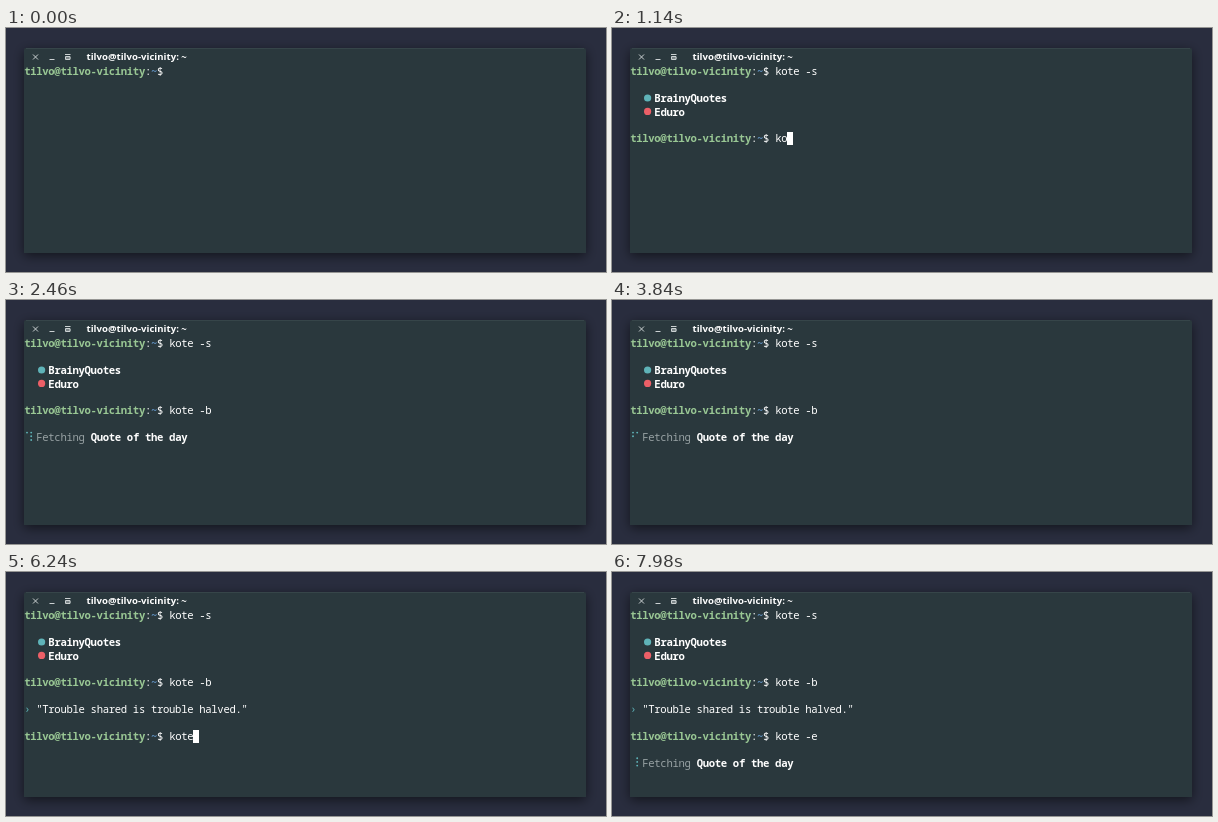
An HTML page for the animation above (8000 ms loop, 600 by 244 pixels).

```html
<!DOCTYPE html>
<html lang="en">
<head>
<meta charset="utf-8">
<title>Terminal</title>
<style>
  html, body { margin: 0; width: 100%; height: 100%; overflow: hidden; background: #292d3e; }
  svg { display: block; width: 100vw; height: 100vh; }
  .mono { font: 10.6px "Noto Sans Mono", "DejaVu Sans Mono", monospace; letter-spacing: -.32px; white-space: pre; fill: #fff; }
  .bold { font-weight: 700; }
  .title { font: 700 9.6px "Open Sans", "Noto Sans", sans-serif; fill: #fff; }
  .user { fill: #99c794; }
  .path { fill: #6699cc; }
  .dim { fill: #98a2a4; }
  .teal { fill: #5fb3b8; }
  .red { fill: #ec5f67; }
  .icon { fill: none; stroke: #cbd1d2; stroke-width: 1; }
</style>
</head>
<body>
<svg viewBox="0 0 600 244">
  <defs>
    <filter id="shadow" x="-10%" y="-20%" width="120%" height="140%">
      <feDropShadow dx="0" dy="3" stdDeviation="6" flood-color="#000" flood-opacity=".55"/>
    </filter>
  </defs>
  <rect width="600" height="244" fill="#292d3e"/>
  <path d="M18 225V22q0-2 2-2H578q2 0 2 2V225z" fill="#29383c" filter="url(#shadow)"/>
  <path d="M20 20.500H578" stroke="#364549"/>
  <path class="icon" d="M27 26.500l5 5m0-5l-5 5M43.500 31.500h5M59 26.500h5.500M59.500 28.500h4.500v3h-4.500zM59 30h5.500"/>
  <text class="title" x="80.500" y="32">tilvo@tilvo-vicinity: ~</text>
  <g id="screen"></g>
</svg>
<script>
const LOOP = 8000, LEFT = 18.2, TOP = 37, CELL = 6.04, LINE = 13.4;
const USER = "tilvo@tilvo-vicinity";
const screen = document.getElementById("screen");
const colX = col => LEFT + col * CELL;
const rowY = row => TOP + row * LINE;
const timed = [];

function add(tag, attrs, parent = screen) {
  const el = document.createElementNS("http://www.w3.org/2000/svg", tag);
  for (const key in attrs) el.setAttribute(key, attrs[key]);
  return parent.appendChild(el);
}

function text(row, col, str, cls = "", parent = screen) {
  const el = add("text", { x: colX(col), y: rowY(row) + 10.4, class: "mono " + cls }, parent);
  el.textContent = str;
  return el;
}

function group(from, to = LOOP) {
  const el = add("g", {});
  timed.push({ el, from, to });
  return el;
}

const show = (el, on) => el.setAttribute("visibility", on ? "visible" : "hidden");

// Prompt with a command typed at the given key times
function command(row, str, start, cursorOn, keys, enter, done) {
  const g = group(start);
  text(row, 0, USER, "user bold", g);
  text(row, 20, ":", "", g);
  text(row, 21, "~", "path bold", g);
  text(row, 22, "$", "", g);
  return { row, str, cursorOn, keys, enter, done, typed: text(row, 24, "") };
}

function source(row, name, color) {
  const g = group(960);
  add("circle", { cx: 35.6, cy: rowY(row) + 6.2, r: 3.6, class: color }, g);
  text(row, 4, name, "bold", g);
}

// Braille patterns as bits: left column 1 2 4, right column 8 16 32
const BRAILLE = [11, 25, 57, 56, 60, 52, 38, 39, 7, 15];

function spinner(row, from, to, phase) {
  const g = group(from, to);
  text(row, 2, "Fetching", "dim", g);
  text(row, 11, "Quote of the day", "bold", g);
  const dots = Array.from({ length: 6 }, (_, i) => add("circle", {
    cx: i < 3 ? 21 : 25.2, cy: rowY(row) + 1.8 + (i % 3) * 3.7, r: 0.95, class: "teal"
  }, g));
  return { dots, phase };
}

const commands = [
  command(0, "kote -s", 0, 60, [60, 120, 180, 240, 300, 420, 480], 660, 960),
  command(5, "kote -b", 1020, 1020, [1080, 1140, 1200, 1260, 1320, 1440, 1500], 1680, 1860),
  command(9, "kote -e", 5820, 5820, [6000, 6060, 6180, 6240, 6300, 6420, 6480], 6840, 7380)
];

source(2, "BrainyQuotes", "teal");
source(3, "Eduro", "red");

const spinners = [
  spinner(7, 1860, 5820, t => t < 3540 ? 12.5 + (t - 2460) / 46 : 40.5 + (t - 3840) / 66.4),
  spinner(11, 7380, LOOP, t => 0.4 + (t - 7380) / 46)
];

const quote = group(5820);
text(7, 0, "›", "teal", quote);
text(7, 2, '"Trouble shared is trouble halved."', "", quote);

const cursor = add("rect", { width: 6, height: 13, fill: "#fff" });

function draw(t) {
  for (const { el, from, to } of timed) show(el, t >= from && t < to);

  let cursorVisible = false;
  for (const c of commands) {
    const count = c.keys.filter(k => t >= k).length;
    c.typed.textContent = c.str.slice(0, count);
    if (t < c.cursorOn || t >= c.done) continue;
    const entered = t >= c.enter;
    cursor.setAttribute("x", Math.floor(colX(entered ? 0 : 24 + count)));
    cursor.setAttribute("y", Math.round(rowY(entered ? c.row + 1 : c.row)));
    cursorVisible = true;
  }
  show(cursor, cursorVisible);

  for (const { dots, phase } of spinners) {
    const bits = BRAILLE[Math.floor(Math.max(0, phase(t))) % BRAILLE.length];
    dots.forEach((dot, i) => dot.setAttribute("opacity", bits >> i & 1));
  }
}

const began = performance.now();
function frame() {
  draw((performance.now() - began) % LOOP);
  requestAnimationFrame(frame);
}
draw(0);
requestAnimationFrame(frame);
</script>
</body>
</html>
```
